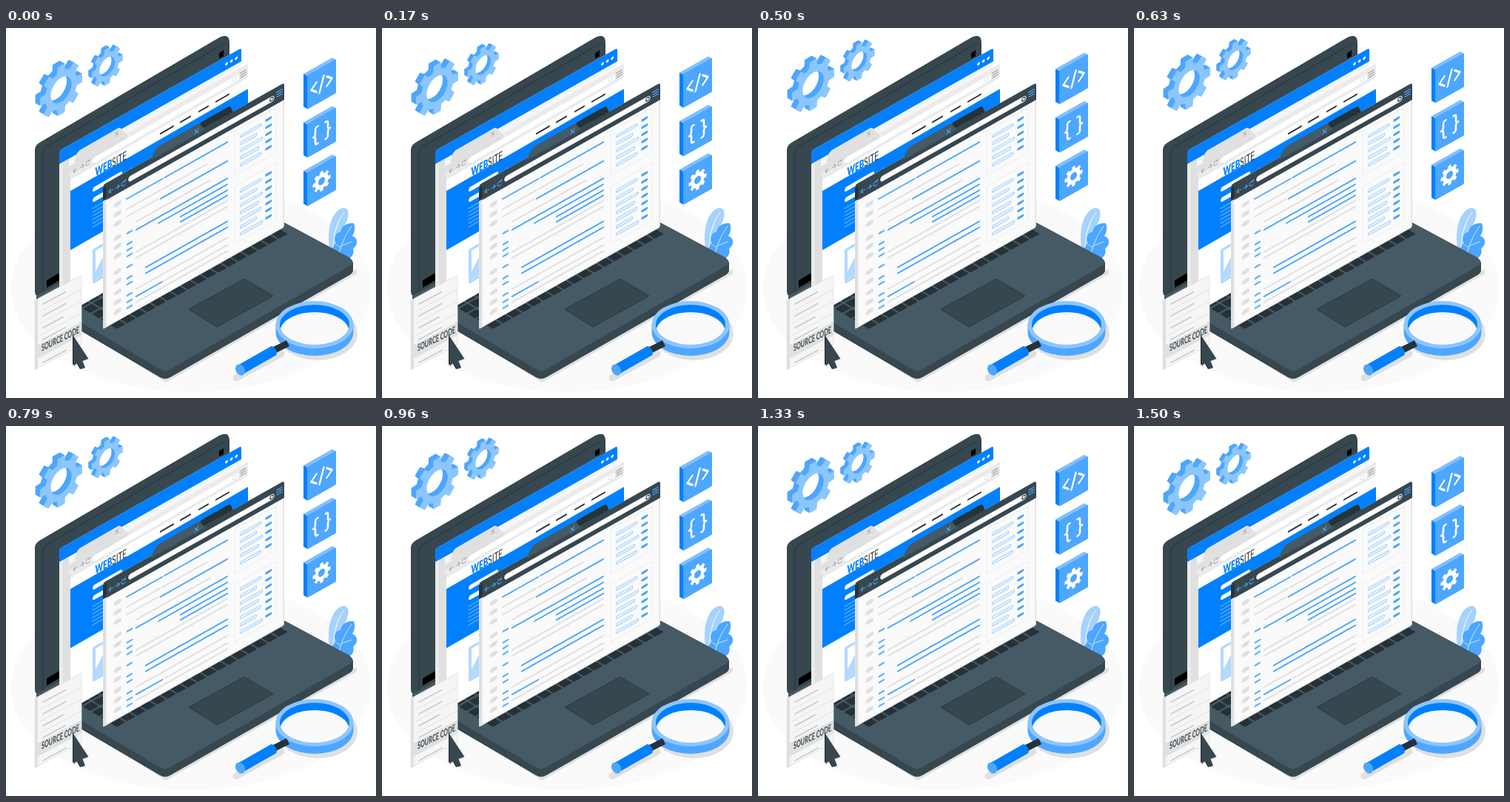
Write an HTML page that moves like this. It is 500 px wide and 500 px high and loops after 1540 ms.

```html
<!DOCTYPE html>
<html lang="en">
<head>
<meta charset="utf-8">
<title>Source code</title>
<style>
html, body { margin: 0; width: 100%; height: 100%; overflow: hidden; background: #fff; }
svg { display: block; width: 100vw; height: 100vh; }
text { font-family: Lato, "Open Sans", sans-serif; }
</style>
</head>
<body>
<svg id="stage" viewBox="0 0 500 500"></svg>
<script>
const BLUE = '#0080ff', MID = '#4da6ff', SOFT = '#8cc6ff', PALE = '#b3d9ff';
const INK = '#263238', SLATE = '#37474f', STEEL = '#455a64';
const GREY = '#e0e0e0', FOG = '#ebebeb', PAPER = '#fafafa';

const poly = (pts, fill, extra = '') => `<polygon points="${pts}" fill="${fill}" ${extra}/>`;
const path = (d, fill, extra = '') => `<path d="${d}" fill="${fill}" ${extra}/>`;
const line = (d, color, w, cap = 'round') =>
  `<path d="${d}" fill="none" stroke="${color}" stroke-width="${w}" stroke-linecap="${cap}" stroke-linejoin="round"/>`;
const bar = (x1, x2, y, color, w = 2, cap = 'round') => line(`M${x1} ${y}H${x2}`, color, w, cap);
const rect = (x, y, w, h, fill, r = 0, extra = '') =>
  `<rect x="${x}" y="${y}" width="${w}" height="${h}" rx="${r}" fill="${fill}" ${extra}/>`;
const oval = (x, y, rx, ry, fill, extra = '') =>
  `<ellipse cx="${x}" cy="${y}" rx="${rx}" ry="${ry}" fill="${fill}" ${extra}/>`;
// Upright plane whose horizontal axis climbs to the right
const plane = (x, y, k, body, sx = 1) =>
  `<g transform="matrix(${sx} ${-k * sx} 0 1 ${x} ${y})">${body}</g>`;
const times = (n, f) => Array.from({ length: n }, (_, i) => f(i)).join('');

function gearPath(R, hole, root = 0.76) {
  const pts = [];
  for (let i = 0; i < 8; i++) {
    for (const [da, r] of [[-0.25, root], [-0.17, 1], [0.17, 1], [0.25, root]]) {
      const a = i * Math.PI / 4 + da;
      pts.push((R * r * Math.cos(a)).toFixed(2) + ' ' + (R * r * Math.sin(a)).toFixed(2));
    }
  }
  return `M${pts.join('L')}ZM${hole} 0A${hole} ${hole} 0 1 0 ${-hole} 0A${hole} ${hole} 0 1 0 ${hole} 0Z`;
}

function gear(x, y, R, depth) {
  const d = gearPath(R, R * 0.49);
  const face = (t, color) => plane(x - depth * t, y - depth * 0.577 * t, 0.577,
    path(d, color, 'fill-rule="evenodd"'), 0.866);
  return times(12, i => face(1 - i / 12, MID)) + face(0, SOFT);
}

function tile(y, glyph) {
  return poly(`402,${y - 2} 441,${y - 24} 446,${y - 21} 407,${y + 1}`, '#80bfff') +
    poly(`402,${y - 2} 407.5,${y + 1} 407.5,${y + 45.5} 402,${y + 42.5}`, BLUE) +
    plane(407, y, 0.565, rect(0, 0, 39, 46, MID, 1) +
      `<g transform="translate(19.5 23)">${glyph}</g>`);
}

function floor() {
  return oval(250, 352, 243.5, 140, PAPER);
}

function lid() {
  return path('M39 165Q39 159 45 155L288 13Q302 6 302 20V223L50 364Q39 364 39 356Z', SLATE) +
    line('M50 362V168Q50 164 54 161L293 22', INK, 1) +
    path('M55 341L72 331V341L55 351Z', '#000') +
    path('M288 34L294 30V38L288 41Z', '#000');
}

function base() {
  const keys = times(5, r => times(17, i =>
    rect(i * 13.7 + 1, r * 12 + 1, 11.6, 9.8, INK, 1)));
  return path('M150 436L216 479L474 332V326L300 400Z', GREY) +
    path('M41 362L215 463L469 316V327Q469 331 464 334L222 472Q215 476 208 472L41 374Z', SLATE) +
    path('M41 362L302 223L464 310Q473 317 464 322L222 461Q215 465 208 461Z', STEEL) +
    `<g transform="matrix(1 -.556 1 .6 90 372)">${keys}</g>` +
    poly('247,380 322,339 361,362 285,404', SLATE, `stroke="${INK}" stroke-width=".8"`);
}

// Back, forward and reload marks
const navMarks = (x, y, color) => `<g transform="translate(${x} ${y})">` +
  line('M6 0H0M2.5 -2.5L0 0L2.5 2.5M8.5 0H14.5M12 -2.5L14.5 0L12 2.5M22 -2.5A3 3 0 1 0 22.5 1.5M22.5 -4V-2H20', color, 1) + '</g>';
const menu = (x, y, color) => times(3, i => bar(x, x + 7, y + i * 3.2, color, 1.4));

function site() {
  const back = rect(0, 0, 246, 210, '#f5f5f5', 3) +
    path('M0 18V3Q0 0 3 0H243Q246 0 246 3V18Z', BLUE) +
    rect(0, 18, 5, 190, FOG) + rect(5, 18, 8, 190, GREY) +
    times(3, i => `<circle cx="${226 + i * 6.6}" cy="10" r="1.9" fill="#fff"/>`);
  const page =
    path('M8 1L11 -10Q13 -14 17 -14H67Q70 -14 72 -10L79 1Z', GREY) +
    rect(0, 0, 243, 197, '#fff', 2) + rect(0, 0, 243, 19, FOG, 2) +
    rect(0, 0, 80, 8, GREY, 2) + rect(0, 12, 3, 185, GREY) +
    line('M64 -10L68 -5M68 -10L64 -5', '#a6a6a6', 0.9) +
    navMarks(7, 10, '#a6a6a6') +
    bar(37, 227, 11, '#fff', 8) +
    `<circle cx="225" cy="11" r="2.6" fill="none" stroke="${GREY}"/>` +
    menu(233, 7, '#a6a6a6') +
    times(4, i => bar([125, 152, 177, 200][i], [142, 165, 189, 217][i], 26.5, INK, 2.2)) +
    rect(3, 34, 240, 80, BLUE) +
    bar(36, 70, 50, '#fff', 6) + bar(36, 70, 64, '#fff', 6) +
    times(6, i => bar(33, 70, 75 + i * 5, '#80bfff', 1)) +
    rect(33, 130, 50, 47, PALE, 2) + rect(37, 134, 42, 39, '#fff', 1) +
    path('M37 173V162L49 146L60 173Z', PALE);
  const title = `<text font-size="16"><tspan font-weight="900" fill="${BLUE}">WEB</tspan><tspan fill="${INK}">SITE</tspan></text>`;
  return plane(72, 166, 0.565, back) + plane(84, 188, 0.575, page) + plane(120.5, 200.5, 0.55, title, 0.62);
}

function sidePanel(y, h, rows) {
  return rect(178, y, 56, h, PAPER, 3, `stroke="${FOG}" stroke-width="1"`) +
    times(rows, i => {
      const v = y + 11 + i * 9.7, end = [212, 206, 214, 209][i % 4];
      return bar(187, end, v, SOFT, 4.4) + bar(187, end, v, '#e6f2ff', 2.8) +
        bar(221, 226.5, v - 2, MID, 3.6);
    });
}

function code() {
  const rows = [
    [37, 32, 80, 1], [37, 83, 168, 1], [51, 32, 77, 0], [51, 80, 140, 0],
    [61, 32, 75, 0], [62.5, 78, 168, 1], [75, 45, 145, 0], [86, 45, 168, 1],
    [94, 75, 168, 1], [102, 105, 168, 1], [109, 105, 168, 1],
    [116, 45, 168, 0], [124, 45, 168, 0], [144, 58, 168, 1], [152, 58, 168, 1],
    [166, 45, 168, 0], [176, 45, 80, 1], [176, 83, 168, 0], [184, 45, 168, 0]
  ];
  const gutter = [37, 50, 63, 82, 94, 107, 128, 141, 156, 169, 182];
  const marks = [84, 99, 107, 115, 130, 145, 153, 168, 177, 185];
  const body =
    rect(0, 0, 245, 195, PAPER, 3) +
    path('M131 0V-8Q132 -10 134 -10H169Q172 -10 173 -7L176 1Z', INK) +
    path('M0 23V3Q0 0 3 0H242Q245 0 245 3V23Z', SLATE) +
    path('M64 3L71 -7Q73 -10 76 -10H128Q131 -10 132 -7L138 3Z', STEEL) +
    rect(0, 20, 4.5, 174, GREY) + rect(0, 4, 4.5, 18, INK) +
    rect(243.5, 23, 1.5, 170, GREY) + bar(1, 244, 194.4, GREY, 1) +
    line('M124 -4L129 2M129 -4L124 2', MID, 1.1) +
    navMarks(8, 14, MID) + bar(38, 228, 12.5, '#fff', 7.5) +
    `<circle cx="228" cy="12.5" r="2.3" fill="none" stroke="${INK}" stroke-width="1.2"/>` +
    menu(235, 7, MID) +
    gutter.map(v => bar(17.5, 22, v, GREY, 6)).join('') +
    marks.map(v => bar(33, 39, v, '#66b3ff', 2.6)).join('') +
    rows.map(([v, a, b, hot]) => bar(a, b, v, hot ? MID : GREY, 2.1)).join('') +
    sidePanel(28, 60, 5) + sidePanel(102, 78, 7);
  return plane(131, 212, 0.563, body);
}

function card() {
  const sheet = rect(0, 0, 63, 94, '#f5f5f5', 1, `stroke="${GREY}" stroke-width=".8"`) +
    rect(0, 0, 4, 94, GREY) + rect(4, 63, 59, 18, GREY) +
    [11, 27, 43, 59, 90].map((v, i) => bar(11, [41, 42, 38, 41, 42][i], v, '#c7c7c7', 1.8)).join('') +
    [19, 35, 51].map(v => bar(4, 62, v, GREY, 1)).join('');
  return plane(39, 368, 0.54, sheet) +
    plane(48, 437, 0.49, `<text font-size="13" font-weight="700" fill="${SLATE}">SOURCE CODE</text>`, 0.56) +
    path('M90 415L90 455L95 452L100 461L105 459L101 449L109 447Z', INK) +
    path('M91 416L91.5 457L97 452L102 461L107 459L103.5 450L111.5 447Z', SLATE);
}

function lens() {
  return oval(421, 413, 54, 36, GREY) + line('M311 473L372 440', GREY, 9) +
    path('M364.500 401V411A52.500 32 0 0 0 469.500 411V401Z', MID) +
    oval(417, 401, 52.5, 32, SOFT) +
    oval(417, 401, 47, 27, BLUE) +
    path('M370.800 406A47 27 0 0 1 463.200 406A47 27 0 0 1 370.800 406Z', PAPER) +
    line('M360 436.500L381 426', INK, 9, 'butt') +
    line('M318 461L361 436.500', BLUE, 14, 'butt') +
    oval(361, 436.5, 4, 7, BLUE, 'transform="rotate(-30 361 436.5)"') +
    oval(316.5, 462, 6, 8, MID, 'transform="rotate(-30 316.5 462)"');
}

function plant() {
  return path('M438 302C433 280 437 247 456 243C466 243 464 260 454 272C448 281 447 293 448 305Z', '#a6d2ff') +
    line('M442 299C443 279 447 261 457 249', '#fff', 1) +
    path('M441 309C439 302 441 295 446 291C442 284 445 276 452 276C453 268 461 263 470 264C473 271 470 278 468 281C476 283 476 294 469 298C472 305 466 313 456 315Z', MID) +
    line('M449 311C451 296 458 280 467 268M453 297L447 293M453 294L467 289', '#d9ecff', 0.9);
}

const tagMark = line('M-7 -6.500L-14 0L-7 6.500M7 -6.500L14 0L7 6.500M3 -10L-3 10', '#fff', 2.6);
const brace = 'M-5 -11.500H-6Q-8.500 -11.500 -8.500 -8V-3.500Q-8.500 0 -11.500 0Q-8.500 0 -8.500 3.500V8Q-8.500 11.500 -6 11.500H-5';
const braceMark = line(brace, '#fff', 2.6) + `<g transform="scale(-1 1)">${line(brace, '#fff', 2.6)}</g>`;
const gearMark = path(gearPath(13.5, 5), '#fff', 'fill-rule="evenodd" transform="scale(.9 1)"');

document.getElementById('stage').innerHTML =
  floor() + plant() + lid() + base() + site() + code() + card() + lens() +
  `<g id="float">${gear(74.5, 83.5, 33.3, 6.5)}${gear(136.7, 52, 24.5, 4.5)}` +
  tile(64, tagMark) + tile(129.5, braceMark) + tile(195, gearMark) + '</g>';

const LOOP = 1540, PEAK = 730, RISE = 9.4;
const floater = document.getElementById('float');

function lift(t) {
  const gap = Math.abs(t - PEAK);
  const d = Math.min(gap, LOOP - gap) / (LOOP / 2);
  return RISE * (1 - d + (1 + Math.cos(Math.PI * d)) / 2) / 2;
}

const start = performance.now();
function draw() {
  const t = (performance.now() - start) % LOOP;
  floater.setAttribute('transform', `translate(0 ${(lift(0) - lift(t)).toFixed(3)})`);
  requestAnimationFrame(draw);
}
draw();
</script>
</body>
</html>
```
